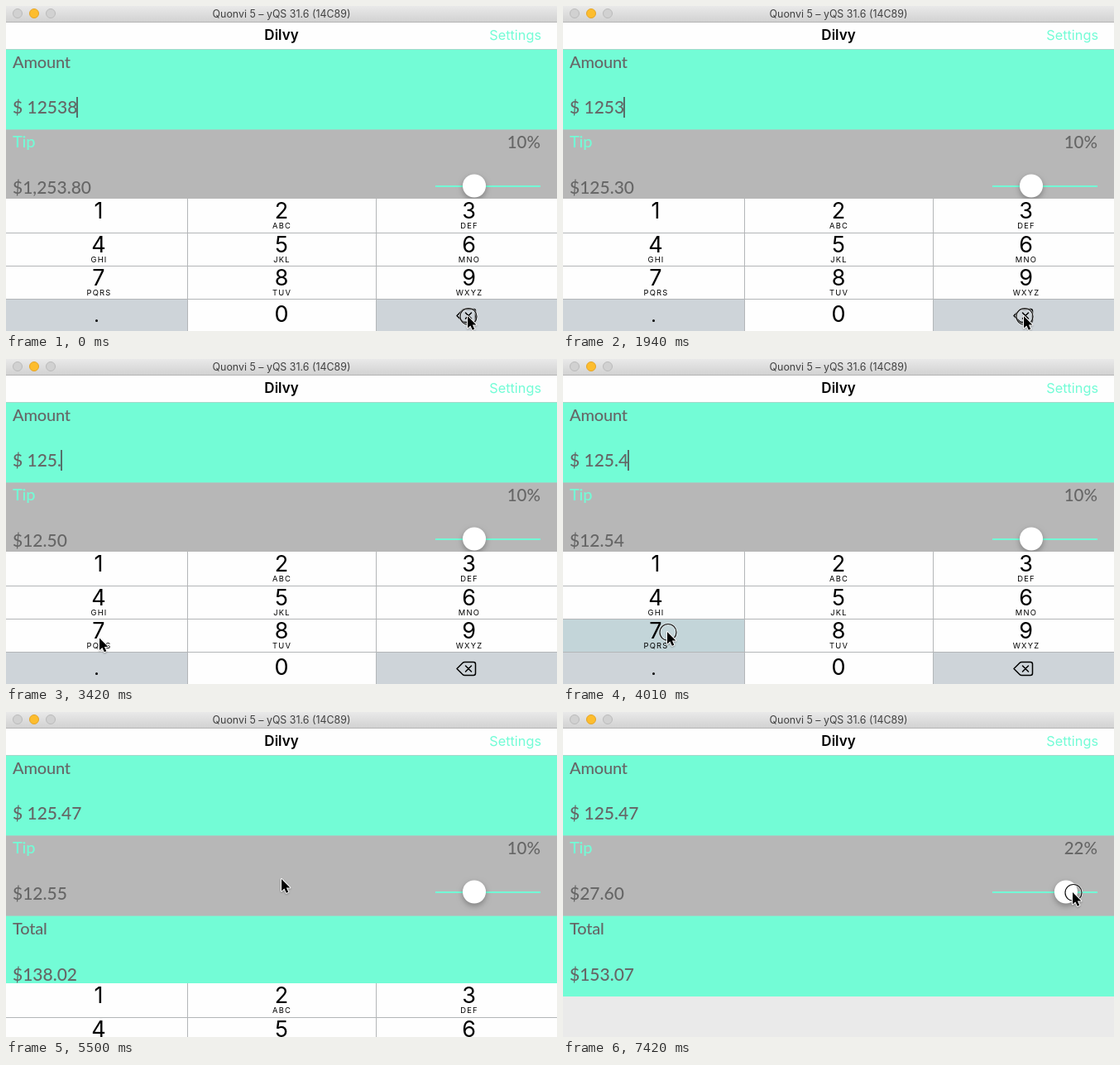
An HTML page with a canvas that plays this animation: 666x393 px, repeating every 8 s.

```html
<!DOCTYPE html>
<html lang="en">
<head>
<meta charset="utf-8">
<title>Tip calculator</title>
<style>
  html, body { margin: 0; width: 100%; height: 100%; overflow: hidden; }
  canvas { display: block; width: 666px; height: 393px; }
</style>
</head>
<body>
<canvas id="stage" width="666" height="393"></canvas>
<script>
const ctx = document.getElementById('stage').getContext('2d');
const LOOP = 8000, TICK = 148.4, LAST_TICK = 50;
const TEAL = '#73fcd6', GRAY = '#b7b7b7', INK = '#666', KEY_GRAY = '#ced4d9';
const GEO = 'Lato, "Open Sans", sans-serif', UI = 'Inter, Roboto, sans-serif';

// All keyframes are [tick, ...values].
const pointerPath = [
  [0, 558, 375], [3, 558, 375], [6, 240, 207], [9, 236, 205], [12, 557, 375],
  [14, 557, 375], [18, 116, 378], [20, 112, 381], [22, 112, 381], [24, 114, 294],
  [25, 114, 294], [27, 126, 330], [28, 126, 330], [32, 333, 202], [39, 333, 202],
  [45, 565, 218], [46, 580, 218], [47, 599, 218], [48, 607, 218], [50, 616, 218]
];
const percentPath = [[0, 10], [45, 10], [46, 12], [47, 17.5], [48, 20], [49, 21.7], [50, 22.7]];
const keyboardPath = [[0, 0], [36, 0], [37, 95], [38, 160]];
const typed = [[0, '12538'], [1, '1253'], [14, '125'], [20, '125.'], [25, '125.4'], [28, '125.47']];
const pressed = [[1, 1, '<', '#fff'], [14, 14, '<', '#fff'], [19, 20, '.', '#fff'],
                 [24, 25, '4', '#c3d5d9'], [27, 28, '7', '#c3d5d9']];
const clicks = [0, 13, 19, 24, 27, 35];

const keys = [['1', ''], ['2', 'ABC'], ['3', 'DEF'], ['4', 'GHI'], ['5', 'JKL'], ['6', 'MNO'],
              ['7', 'PQRS'], ['8', 'TUV'], ['9', 'WXYZ'], ['.', ''], ['0', ''], ['<', '']];
const colEdges = [0, 219, 447, 666], rowEdges = [233, 274, 314, 354, 393];
const colCenters = [112, 333, 559.5], digitBaselines = [257, 298, 338, 382];

function sample(path, tick) {
  const next = path.findIndex(p => p[0] > tick);
  if (next < 0) return path[path.length - 1].slice(1);
  const a = path[next - 1], b = path[next];
  const u = (tick - a[0]) / (b[0] - a[0]), ease = u * u * (3 - 2 * u);
  return a.slice(1).map((v, i) => v + (b[i + 1] - v) * ease);
}

function rect(x, y, w, h, color) {
  ctx.fillStyle = color;
  ctx.fillRect(x, y, w, h);
}

function disc(x, y, r, fill, stroke, width = 1) {
  ctx.beginPath();
  ctx.arc(x, y, r, 0, Math.PI * 2);
  if (fill) { ctx.fillStyle = fill; ctx.fill(); }
  if (stroke) { ctx.strokeStyle = stroke; ctx.lineWidth = width; ctx.stroke(); }
}

function text(str, x, y, font, color = INK, align = 'left', spacing = 0) {
  ctx.font = font;
  ctx.letterSpacing = spacing + 'px';
  ctx.textAlign = align;
  ctx.fillStyle = color;
  ctx.fillText(str, x, y);
  return ctx.measureText(str).width;
}

const label = (str, y, color) => text(str, 8, y, `500 20px ${GEO}`, color, 'left', -0.2);
const figure = (str, y) => text(str, 8, y, `500 21px ${GEO}`);
const money = n => '$' + n.toLocaleString('en-US', { minimumFractionDigits: 2, maximumFractionDigits: 2 });

function caretAlpha(ms) {
  const p = ms % 1300;
  if (p < 600) return 1;
  if (p < 950) return 1 - (p - 600) / 350;
  return p < 1100 ? 0 : (p - 1100) / 200;
}

function drawHeader() {
  const bar = ctx.createLinearGradient(0, 0, 0, 19);
  bar.addColorStop(0, '#e9e9e9');
  bar.addColorStop(1, '#d2d2d2');
  rect(0, 0, 666, 19, bar);
  rect(0, 19, 666, 1, '#b4b4b4');
  disc(14, 9, 5.5, '#d1d1d1', '#bbb');
  disc(34, 9, 5.5, '#fdbd2e', '#e5a528');
  disc(54, 9, 5.5, '#d1d1d1', '#bbb');
  text('Quonvi 5 – yQS 31.6 (14C89)', 333, 14, `12.4px ${UI}`, '#404040', 'center');
  rect(0, 20, 666, 32, '#fefefe');
  rect(0, 52, 666, 1, '#a5d9cb');
  text('Dilvy', 333, 41, `600 17px ${UI}`, '#000', 'center');
  text('Settings', 647, 41, `16.3px ${UI}`, TEAL, 'right');
}

function drawRows(tick) {
  const [start, amount] = typed.filter(e => e[0] <= tick).pop();
  const [value] = sample(percentPath, tick);
  const percent = Math.floor(value + 1e-6);
  const tip = Number(amount) * percent / 100;

  rect(0, 53, 666, 97, TEAL);
  rect(0, 150, 666, 97, GRAY);
  rect(0, 149, 666, 1, '#9fd3c4');
  rect(0, 247, 666, 97, TEAL);
  rect(0, 246, 666, 1, '#9fd3c4');

  label('Amount', 75);
  const width = figure('$ ' + amount, 130);
  if (tick < 37) {
    ctx.globalAlpha = caretAlpha((tick - start) * TICK);
    rect(Math.round(8 + width) - 1, 110, 2, 25, '#55706a');
    ctx.globalAlpha = 1;
  }
  label('Tip', 171, TEAL);
  figure(money(tip), 227);
  text(percent + '%', 646, 172, `500 20.5px ${GEO}`, INK, 'right');
  label('Total', 269);
  figure(money(Number(amount) + tip), 325);

  rect(519, 217, 127, 2, TEAL);
  ctx.save();
  ctx.shadowColor = 'rgba(0,0,0,.3)';
  ctx.shadowBlur = 7;
  ctx.shadowOffsetY = 3;
  disc(533 + 3.3 * value, 217.5, 14, '#fff');
  ctx.restore();
}

function drawDeleteIcon() {
  ctx.strokeStyle = '#000';
  ctx.lineWidth = 1.5;
  ctx.lineJoin = ctx.lineCap = 'round';
  ctx.stroke(new Path2D('M545 374.5 L552 367.5 Q553 366.5 554.5 366.5 H565 Q567.5 366.5 567.5 369 V380 Q567.5 382.5 565 382.5 H554.5 Q553 382.5 552 381.5 Z M555.5 371 L562.5 378 M562.5 371 L555.5 378'));
}

function drawKeyboard(tick) {
  const [drop] = sample(keyboardPath, tick);
  if (drop >= 160) return;
  ctx.save();
  ctx.translate(0, drop);
  keys.forEach(([digit, letters], i) => {
    const col = i % 3, row = Math.floor(i / 3);
    const x = colEdges[col], y = rowEdges[row], center = colCenters[col];
    const press = pressed.find(p => tick >= p[0] && tick <= p[1] && p[2] === digit);
    const base = '.<'.includes(digit) ? KEY_GRAY : '#fefefe';
    rect(x, y, colEdges[col + 1] - x, rowEdges[row + 1] - y, press ? press[3] : base);
    if (digit === '<') drawDeleteIcon();
    else if (digit === '.') disc(109.5, 380.5, 1.5, '#000');
    else text(digit, center, digitBaselines[row], `27px ${UI}`, '#000', 'center');
    if (letters) text(letters, center + 0.5, digitBaselines[row] + 11.5, `9.4px ${UI}`, '#000', 'center', 1.2);
  });
  rowEdges.slice(1, 4).forEach(y => rect(0, y, 666, 1, '#b3b6b8'));
  colEdges.slice(1, 3).forEach(x => rect(x, 233, 1, 160, '#b3b6b8'));
  ctx.restore();
}

function drawPointer(tick) {
  const [x, y] = sample(pointerPath, tick);
  if (clicks.includes(tick) || tick >= 46) {
    disc(x + 1, y + 0.5, 10, null, 'rgba(255,255,255,.6)', 2.5);
    disc(x + 1, y + 0.5, 10, null, '#111', 1.2);
  }
  ctx.save();
  ctx.translate(x, y);
  const arrow = new Path2D('M0 0 V14.5 L3.4 11.4 L5.8 16.8 L8.3 15.7 L5.9 10.4 H10.4 Z');
  ctx.lineJoin = 'round';
  ctx.lineWidth = 2;
  ctx.strokeStyle = '#fff';
  ctx.shadowColor = 'rgba(0,0,0,.3)';
  ctx.shadowBlur = 2;
  ctx.shadowOffsetY = 1;
  ctx.stroke(arrow);
  ctx.shadowColor = 'transparent';
  ctx.fillStyle = '#000';
  ctx.fill(arrow);
  ctx.restore();
}

function draw(now) {
  const tick = Math.min(LAST_TICK, Math.floor((now % LOOP + 10) / TICK));
  rect(0, 0, 666, 393, '#eaeaea');
  drawHeader();
  drawRows(tick);
  drawKeyboard(tick);
  drawPointer(tick);
  requestAnimationFrame(draw);
}
requestAnimationFrame(draw);
</script>
</body>
</html>
```
